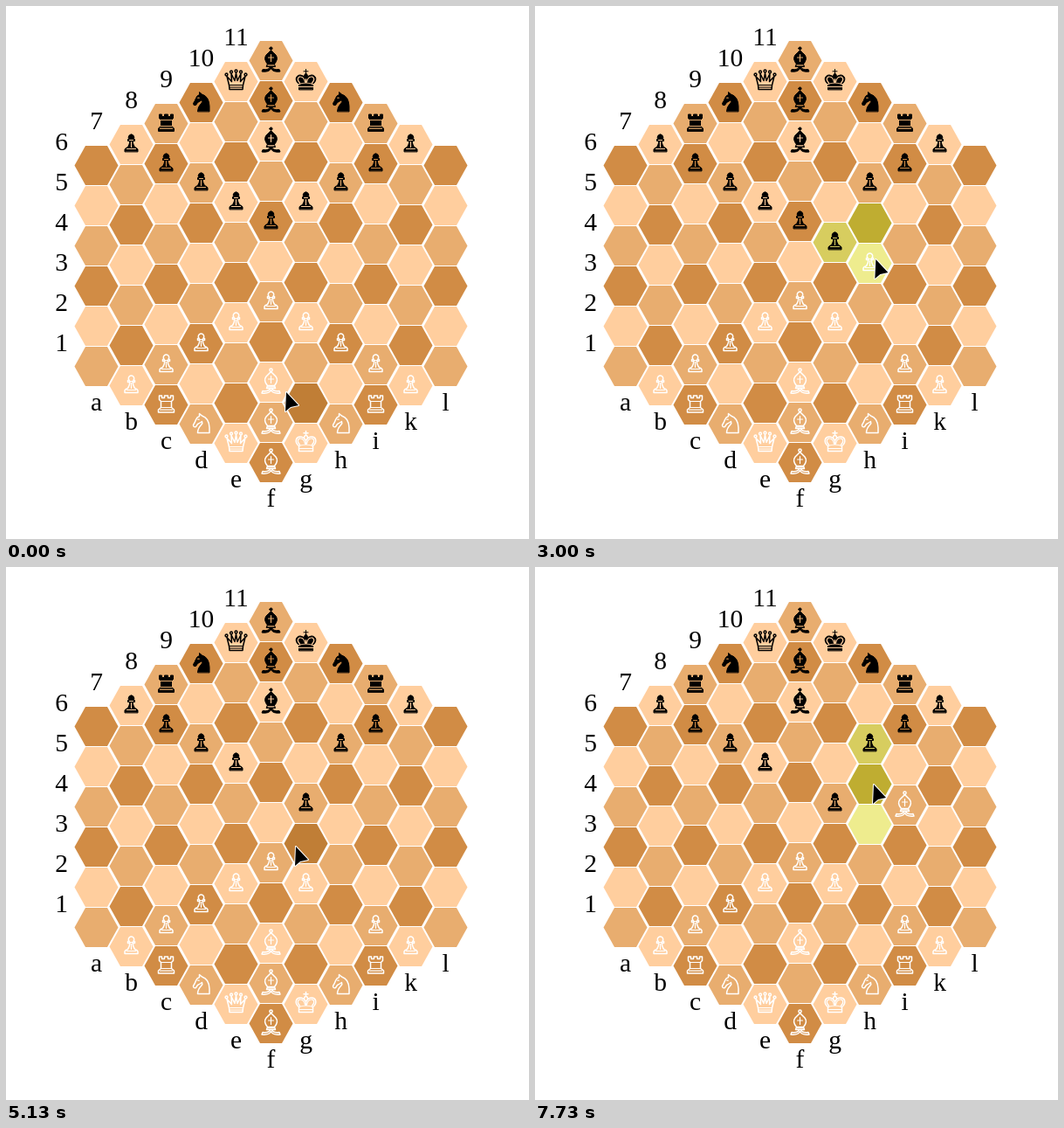
An HTML page with a canvas for the animation above (8 s loop, 599 px wide and 610 px high).

```html
<!DOCTYPE html>
<html>
<head>
<meta charset="utf-8">
<title>Hexagonal chess</title>
<style>
html, body { margin: 0; width: 100%; height: 100%; overflow: hidden; background: #fff; }
canvas { display: block; }
</style>
</head>
<body>
<canvas id="stage" width="599" height="610"></canvas>
<script>
const ctx = document.getElementById('stage').getContext('2d');
const FILES = 'abcdefghikl';
const STEPS = 120;
const STEPS_PER_MS = 0.015;

// Tints by cell shade: medium, dark, light
const PLAIN = ['#e8ad6f', '#d18c45', '#ffce9e'];
const HOVER = ['#d79d64', '#c07e36', '#ebc097'];
const MARKED = ['#d7cd5f', '#bfad31', '#eeec8e'];

// Each piece: outline and inner detail, around the cell centre
const ball = (x, y, r) => `M${x - r} ${y}a${r} ${r} 0 1 0 ${2 * r} 0a${r} ${r} 0 1 0 ${-2 * r} 0Z`;
const points = [-2, -1, 0, 1, 2].map(k => ball(5.5 * k, -12 + k * k, 1.4)).join('');
const SHAPES = {
  P: ['M-7.5 8V5.5Q-7 4-4 3Q-1.8-.5-1.6-4H-4V-6H-2.2A3.2 3.2 0 1 1 2.2-6H4V-4H1.6Q1.8-.5 4 3Q7 4 7.5 5.5V8Z',
      'M-5 5H5M-2-5H2M0-3V3'],
  R: ['M-9 8.5V5.5L-6 3V-4L-8-6V-10.5H-5V-8H-2V-10.5H2V-8H5V-10.5H8V-6L6-4V3L9 5.5V8.5Z',
      'M-6 3H6M-6-4H6M-7 5.7H7'],
  N: ['M-4 10Q-4 5 0 1Q2-1 1-3Q-2-1-4 0L-6 3Q-9 4-9 1Q-7-2-6-5Q-5-8-2-9L-2-12L1-9.5Q9-7 9.5 4V10Z',
      'M-3.8-5.3h1.5'],
  B: [ball(0, -14, 1.6) +
      'M-4 4Q-9-2-5.5-6.5Q-3-9 0-12Q3-9 5.5-6.5Q9-2 4 4ZM-4 4H4L5 7H-5Z' +
      'M-1 7Q-2 11-9.5 10L-10.5 12.5Q-2 13.5 0 9Q2 13.5 10.5 12.5L9.5 10Q2 11 1 7Z',
      'M0-7V1M-3-3.5H3M-3.5 5.3H3.5'],
  Q: [points + 'M-8 4L-10.5-6L-5 0L-5.5-9L-1.5-1L0-10L1.5-1L5.5-9L5 0L10.5-6L8 4L7.5 9H-7.5Z',
      'M-8 4H8M-7.5 6.5H7.5'],
  K: ['M0-9V-14M-2.5-11.7H2.5M0-3Q-4-7 0-9.5Q4-7 0-3Z' +
      'M-8 9V3C-14-2-11-8-6-7.5Q-2-7 0-3Q2-7 6-7.5C11-8 14-2 8 3V9Z',
      'M-8 3Q0 0 8 3M-8 6H8M0-3V1M-7 1.5C-11-2-9-6-6-5.5Q-2-5-1 .5M7 1.5C11-2 9-6 6-5.5Q2-5 1 .5']
};
for (const k in SHAPES) SHAPES[k] = SHAPES[k].map(d => new Path2D(d));
const HOLLOW = 'Q'; // drawn as an outline on both sides

const HEX = new Path2D('M-25 0L-12.5-22.5H12.5L25 0L12.5 22.5H-12.5Z');
const ARROW = new Path2D('M-1 1L-2 23L4 18L13 16Z');

// Black's setup; White stands mirrored
const SETUP = { B: 'f0 f1 f2', Q: 'e0', K: 'g0', N: 'd0 h0', R: 'c0 i0', P: 'b0 c1 d2 e3 f4 g3 h2 i1 k0' };

const MOVES = [
  { from: 'h6', to: 'h4', pick: 17, drop: 23, options: 'h5' },
  { from: 'g3', to: 'g4', pick: 31, drop: 38, options: 'g5' },
  { from: 'h4', to: 'g4', pick: 44, drop: 49, options: 'h3' },
  { from: 'f4', to: 'g4', pick: 62, drop: 69, options: 'f5' },
  { from: 'f9', to: 'i3', pick: 90, drop: 100, options: 'b1 k1 c3 d5 h5 e7 g7' },
  { from: 'h2', to: 'h4', pick: 112, drop: Infinity, options: 'h3' }
];

// Pointer detours between clicks: step, x, y
const DETOURS = [
  [-1, 352, 474], [1, 292, 408], [3, 292, 408], [9, 352, 326], [15, 399, 378],
  [27, 332, 217], [56, 297, 274], [77, 333, 319], [97, 413, 296], [116, 389, 248]
];

const cells = {};
const fileLength = c => 11 - Math.abs(c - 5);
for (let c = 0; c < 11; c++) {
  const d = Math.abs(c - 5);
  for (let i = 0; i < fileLength(c); i++) {
    cells[FILES[c] + i] = { x: 103.5 + 40 * c, y: 62.5 + 24 * d + 46 * i, shade: (i + 2 * d) % 3 };
  }
}

const clickAt = (step, id) => [step, cells[id].x + 12, cells[id].y - 3];
const stops = DETOURS
  .concat(MOVES.flatMap(m => [clickAt(m.pick, m.from), clickAt(m.drop, m.to)]))
  .sort((a, b) => a[0] - b[0]);

function pointer(n) {
  const k = stops.findIndex(s => s[0] > n);
  const [t0, x0, y0] = stops[k - 1], [t1, x1, y1] = stops[k];
  const f = (n - t0) / (t1 - t0);
  const ease = f * f * (3 - 2 * f);
  return [x0 + (x1 - x0) * ease, y0 + (y1 - y0) * ease];
}

function inside(cell, [x, y]) {
  const dx = Math.abs(x - cell.x), dy = Math.abs(y - cell.y);
  return dy < 22.5 && dx < 25 - dy / 1.8;
}

function mirror(id) {
  const file = id[0];
  return file + (fileLength(FILES.indexOf(file)) - 1 - id.slice(1));
}

function boardAt(n) {
  const pieces = {}, marked = new Set();
  let last = '';
  for (const kind in SETUP) {
    for (const id of SETUP[kind].split(' ')) {
      pieces[id] = { kind, white: false };
      pieces[mirror(id)] = { kind, white: true };
    }
  }
  for (const { from, to, pick, drop, options } of MOVES) {
    if (n >= drop) {
      pieces[to] = pieces[from];
      delete pieces[from];
      last = to;
    } else if (n >= pick) {
      [from, to, ...options.split(' ')].forEach(id => marked.add(id));
    }
  }
  return { pieces, marked, last };
}

function drawPiece({ kind, white }, ground) {
  const [outline, detail] = SHAPES[kind];
  const solid = !white && kind !== HOLLOW;
  const ink = white ? '#fff' : '#000';
  ctx.lineJoin = ctx.lineCap = 'round';
  ctx.strokeStyle = ctx.fillStyle = ink;
  ctx.lineWidth = solid ? 1 : 1.5;
  if (solid) ctx.fill(outline);
  ctx.stroke(outline);
  ctx.strokeStyle = solid ? ground : ink;
  ctx.lineWidth = 1.2;
  ctx.stroke(detail);
}

function at(x, y, draw) {
  ctx.save();
  ctx.translate(x, y);
  draw();
  ctx.restore();
}

function drawLabels() {
  ctx.fillStyle = '#000';
  ctx.font = '29.5px "Liberation Serif", "Times New Roman", serif';
  ctx.textAlign = 'center';
  for (let c = 0; c < 11; c++) {
    ctx.fillText(FILES[c], 103.5 + 40 * c, 573 - 22 * Math.abs(c - 5));
  }
  for (let k = 1; k <= 11; k++) {
    const d = Math.min(6, 12 - k);
    ctx.fillText(k, 303.5 - 40 * d, 21 + 24 * d + 46 * Math.max(0, 6 - k));
  }
}

function render(n) {
  const { pieces, marked, last } = boardAt(n);
  const touch = pointer(n - 0.3); // the highlight trails the pointer
  ctx.fillStyle = '#fff';
  ctx.fillRect(0, 0, 599, 610);
  drawLabels();
  for (const id in cells) {
    const { x, y, shade } = cells[id];
    const hovered = id !== last && inside(cells[id], touch);
    const ground = (marked.has(id) ? MARKED : hovered ? HOVER : PLAIN)[shade];
    at(x, y, () => {
      ctx.fillStyle = ground;
      ctx.fill(HEX);
      if (pieces[id]) drawPiece(pieces[id], ground);
    });
  }
  at(...pointer(n), () => {
    ctx.lineJoin = 'round';
    ctx.strokeStyle = '#fff';
    ctx.lineWidth = 2;
    ctx.stroke(ARROW);
    ctx.fillStyle = '#000';
    ctx.fill(ARROW);
  });
}

const start = performance.now();
function frame() {
  const t = (performance.now() - start) % 8000;
  render(Math.floor(t * STEPS_PER_MS + 0.1) % STEPS);
  requestAnimationFrame(frame);
}
frame();
</script>
</body>
</html>
```
